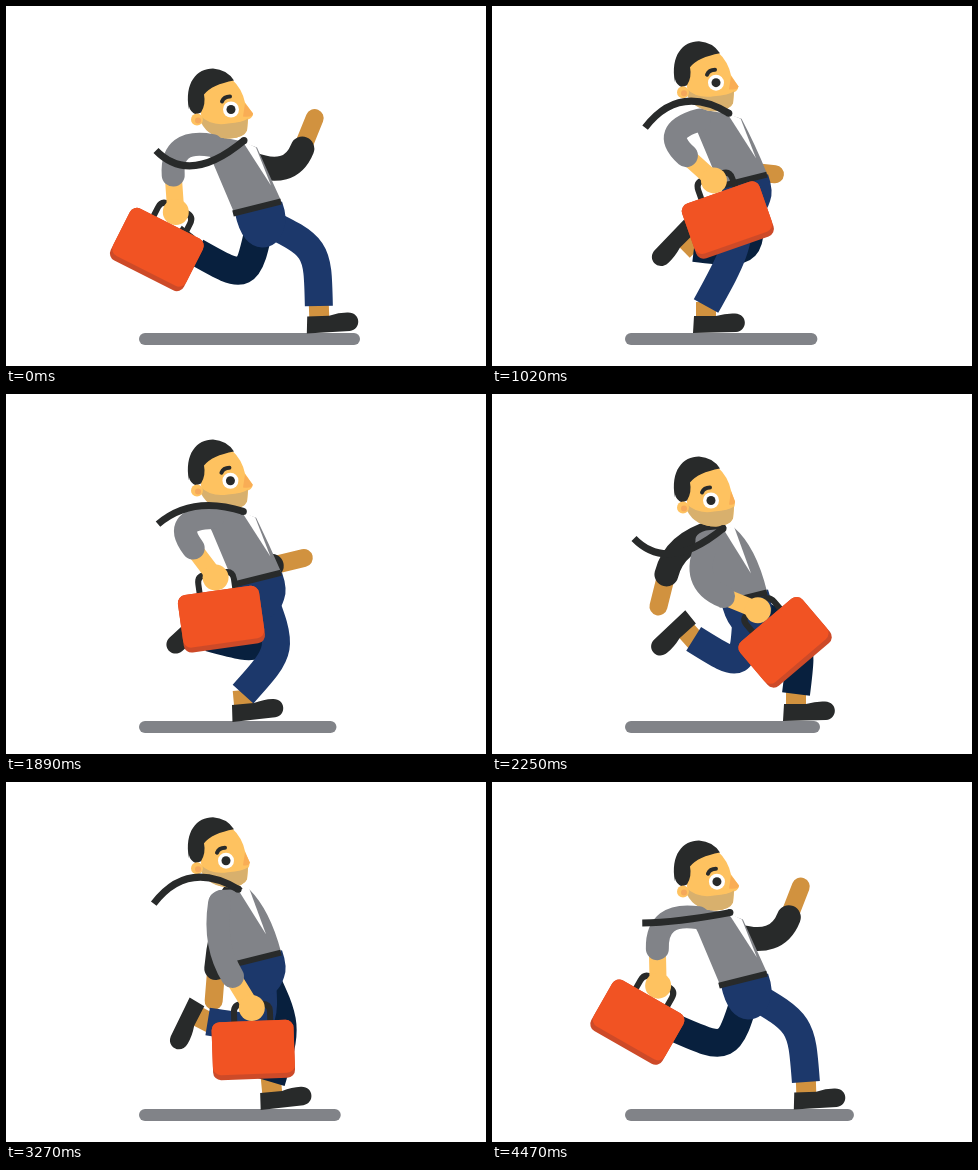
An HTML page with a canvas for the animation above (4.5 s loop, 480x360 px).

```html
<!DOCTYPE html>
<html lang="en">
<head>
<meta charset="utf-8">
<title>Running businessman</title>
<style>
html, body { margin: 0; width: 100%; height: 100%; overflow: hidden; background: #fff; }
canvas { display: block; }
</style>
</head>
<body>
<canvas id="stage" width="480" height="360"></canvas>
<script>
const ctx = document.getElementById('stage').getContext('2d');
const { sin, cos, PI, hypot, min, max, sqrt } = Math;
const CYCLE = 900, STEP = 30, FAR_LEG_DELAY = 510;
const DARK = '#282a2a', GREY = '#818388', SKIN = '#fec260', FAR_SKIN = '#d1923f',
  NAVY = '#1c386b', FAR_NAVY = '#08203e', BEARD = '#d8b06d', ORANGE = '#f15323';
const rad = degrees => degrees * PI / 180;

// Key poses of one cycle. Limb angles count forward from hanging straight down.
const ARM_TIMES = [0, 120, 285, 450, 600, 750];
const NEAR_ARM = { upper: [-100, -75, 60, -25, -9, -72], fore: [4, 48, 85, 68, 24, 8] };
const FAR_ARM = { upper: [68, -35, -65, -75, -5, 45], fore: [158, 84, 10, -14, 6, 118] };

// One stride, used by both legs.
const STRIDE_TIMES = [0, 120, 240, 450, 600, 720, 840];
const STRIDE = {
  x: [313, 214, 160, 199, 203, 270, 304],
  y: [304, 304, 255, 242, 239, 262, 304],
  angle: [-2, 0, 65, 138, 105, 20, 0]
};

// Smooth periodic curve through values at the given times.
function spline(times, values, time, period = CYCLE) {
  const n = times.length, t = time % period;
  const at = i => times[(i + n) % n] + Math.floor(i / n) * period;
  const value = i => values[(i + n) % n];
  let i = n - 1;
  while (at(i) > t) i--;
  const span = at(i + 1) - at(i), u = (t - at(i)) / span;
  const slope = j => (value(j + 1) - value(j - 1)) / (at(j + 1) - at(j - 1)) * span;
  const a = value(i), b = value(i + 1), m0 = slope(i), m1 = slope(i + 1);
  return a + u * (m0 + u * (3 * (b - a) - 2 * m0 - m1 + u * (m0 + m1 - 2 * (b - a))));
}

function fill(color, d) {
  ctx.fillStyle = color;
  ctx.fill(new Path2D(d));
}
function stroke(color, width, d, cap = 'round') {
  ctx.strokeStyle = color;
  ctx.lineWidth = width;
  ctx.lineCap = cap;
  ctx.stroke(new Path2D(d));
}
function disc(color, x, y, r) {
  ctx.fillStyle = color;
  ctx.beginPath();
  ctx.arc(x, y, r, 0, 2 * PI);
  ctx.fill();
}
function box(color, x, y, w, h, r) {
  ctx.fillStyle = color;
  ctx.beginPath();
  ctx.roundRect(x, y, w, h, r);
  ctx.fill();
}
function placed(x, y, degrees, draw) {
  ctx.save();
  ctx.translate(x, y);
  ctx.rotate(rad(degrees));
  draw();
  ctx.restore();
}

// The knee follows from hip and ankle, with thigh and shin of equal length.
function leg(time, hipY, pants, skin) {
  const [x, y, angle] = ['x', 'y', 'angle'].map(k => spline(STRIDE_TIMES, STRIDE[k], time));
  const hipX = 255, ankleY = min(y, 304), bone = 63;
  const dx = x - hipX, dy = ankleY - hipY, d = hypot(dx, dy);
  const bend = sqrt(max(0, bone ** 2 - d * d / 4));
  const knee = `${hipX + dx / 2 + dy / d * bend} ${hipY + dy / 2 - dx / d * bend}`;
  placed(x, ankleY, angle, () => {
    box(skin, -10, -8, 20, 16, 0);
    fill(DARK, 'M-12 6L10 6Q20 3 29 3.5C42 4 42 21 30 22L-13 23Z');
  });
  const a = rad(angle);
  stroke(pants, 28, `M${hipX} ${hipY}C${knee} ${knee} ${x + 4 * sin(a)} ${ankleY - 4 * cos(a)}`, 'butt');
}

function arm(keys, time, x, y, upperLength, foreLength) {
  const upper = rad(spline(ARM_TIMES, keys.upper, time));
  const foreAngle = spline(ARM_TIMES, keys.fore, time), fore = rad(foreAngle);
  const elbowX = x + upperLength * sin(upper), elbowY = y + upperLength * cos(upper);
  const along = part => [elbowX + part * foreLength * sin(fore), elbowY + part * foreLength * cos(fore)];
  const cuff = along(0.5), hand = along(1);
  return {
    hand, foreAngle,
    sleeve: `M${x} ${y}Q${elbowX} ${elbowY} ${cuff}`,
    forearm: `M${cuff}L${hand}`
  };
}

function drawFarArm(time, turn) {
  const { sleeve, forearm } = arm(FAR_ARM, time, 223 + 22 * turn, 75 + 20 * turn, 42, 66);
  stroke(FAR_SKIN, 18, forearm);
  stroke(DARK, 24, sleeve);
}

function drawNearArm({ hand, sleeve, forearm }, bagAngle) {
  placed(...hand, bagAngle, () => stroke(DARK, 6, 'M-18 16V4Q-18 -4 -10 -4H10Q18 -4 18 4V16'));
  stroke(SKIN, 17, forearm);
  disc(SKIN, ...hand, 13);
  stroke(GREY, 23, sleeve);
}

function drawBag({ hand }, bagAngle) {
  placed(...hand, bagAngle, () => {
    box('#cd4a28', -41, 13, 82, 58, 8);
    box(ORANGE, -41, 13, 82, 53, 8);
  });
}

function drawTorso(turn) {
  const drop = 3 * (1 - turn), neck = 74 - 7 * turn;
  fill(GREY, `M${214 - 6 * turn} ${neck}Q198 78 206 92L228 ${144 + drop}L275 ${132 + drop}
    Q${264 - turn} ${90 + 16 * turn} ${242 + 9 * turn} ${71 + 8 * turn}L232 72Z`);
  fill('#fff', `M${231 + 5 * turn} 72L${259 + 6 * turn} 117L${242 + 8 * turn} ${70 + 9 * turn}Z`);
  stroke(DARK, 6, `M227 ${145 + drop}L275 ${133 + drop}`, 'butt');
}

function drawHead(turn) {
  const nose = 243 + 4 * turn, eyeX = 219 + 6 * turn, eyeY = 44 - 3 * turn;
  fill(SKIN, `M226 11Q236 20 239 34L${nose} 45Q${nose} 49 242 51L241 62Q238 69 224 70Q200 70 195 46L194 20Z`);
  fill(BEARD, 'M194 47Q205 58 222 55Q237 54 242 50L241 62Q238 69 224 70Q203 70 195 54Z');
  fill('#f9ad55', `M239 35L${nose} 45Q${nose} 49 237 48Z`);
  fill(DARK, 'M183 41C178 14 191 0 207 0Q221 1 228 12Q206 16 198 26Q200 36 195 44L190 46Q184 43 183 38Z');
  disc(SKIN, 191, 51, 6);
  disc('#f5a85b', 192, 52, 3);
  disc('#fff', eyeX, eyeY, 8);
  disc(DARK, eyeX, eyeY, 4.5);
  stroke(DARK, 4, `M${eyeX - 9} ${eyeY - 8}Q${eyeX - 7} ${eyeY - 13} ${eyeX - 1} ${eyeY - 13}`);
}

function drawTie(time, turn, lift) {
  const x = 142 + 8 * turn + 8 * lift, knot = 231 + 7 * turn;
  const bend = spline([0, 120, 330, 420], [117, 42, 50, 82], time, CYCLE / 2);
  stroke(DARK, 7, `M${x} ${82 + 8 * lift}Q${x + 34} ${bend} ${knot} 72`, 'butt');
  disc(DARK, knot, 72, 3.5);
}

function draw(time) {
  const phase = 2 * PI * time / CYCLE;
  const turn = (1 + cos(phase)) / 2, lift = (1 - cos(2 * phase)) / 2;
  const bodyY = 62.5 - 46 * lift + 2 * sin(6 * phase);
  const hipY = bodyY + 151;
  const shadowEnd = 335 + 13 * cos(phase) - 18 * sin(phase) - 11 * sin(2 * phase);
  const nearArm = arm(NEAR_ARM, time, 215 - 9 * turn, 88 - 11 * turn, 42, 74);
  const bagAngle = 31 - 1.05 * nearArm.foreAngle;

  ctx.fillStyle = '#fff';
  ctx.fillRect(0, 0, 480, 360);
  stroke(GREY, 12, `M139 333H${shadowEnd}`);

  placed(0, bodyY, 0, () => drawFarArm(time, turn));
  leg(time + FAR_LEG_DELAY - 120, hipY, FAR_NAVY, FAR_SKIN);
  leg(time, hipY, NAVY, FAR_SKIN);
  placed(0, bodyY, 0, () => {
    fill(NAVY, 'M229 145L276 133Q282 150 278 160Q272 179 256 179Q236 178 229 145Z');
    drawTorso(turn);
    drawHead(turn);
    drawNearArm(nearArm, bagAngle);
    drawTie(time, turn, lift);
    drawBag(nearArm, bagAngle);
  });
}

function frame(now) {
  draw(Math.floor(now / STEP) * STEP % CYCLE);
  requestAnimationFrame(frame);
}
requestAnimationFrame(frame);
</script>
</body>
</html>
```
